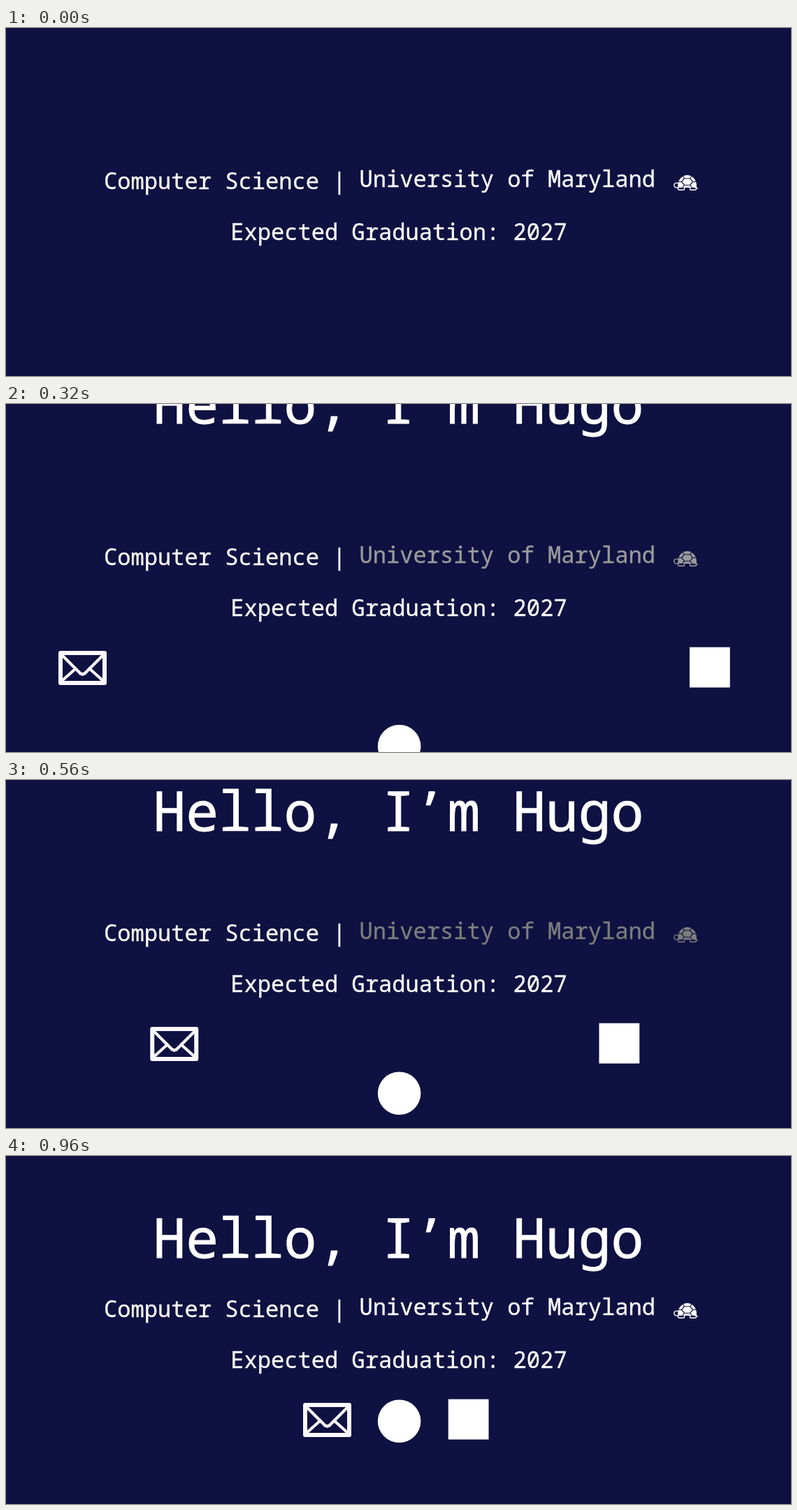
Animation, 1123 px wide and 499 px high, one loop 1000 ms. Source, as an HTML page with a canvas:

```html
<!DOCTYPE html>
<html lang="en">
<head>
<meta charset="utf-8">
<title>Hello</title>
<style>
  html, body { margin: 0; width: 100%; height: 100%; overflow: hidden; background: #0e1141; }
  canvas { display: block; }
</style>
</head>
<body>
<canvas id="stage" width="1123" height="499"></canvas>
<script>
const ctx = document.getElementById('stage').getContext('2d');
const LOOP = 1000, STEP = 40, END = 960;
const BACK = '#0e1141', WHITE = '#fff';
const SMALL = 32.1, LARGE = 78;

// The pulsing words dim towards the middle of the loop and recover.
function greyAt(t) {
  const fade = Math.min(1, Math.abs(t - 475) / 480) ** 0.7;
  const v = Math.round(70 + 185 * fade);
  return `rgb(${v},${v},${v})`;
}

// A hairline outline gives the letters a slightly sturdier weight.
function text(str, x, baseline, size, color = WHITE) {
  ctx.font = `${size}px "Noto Sans Mono", "DejaVu Sans Mono", monospace`;
  ctx.fillStyle = ctx.strokeStyle = color;
  ctx.lineWidth = size / 90;
  ctx.fillText(str, x, baseline);
  ctx.strokeText(str, x, baseline);
}

function line(x1, y1, x2, y2) {
  ctx.beginPath();
  ctx.moveTo(x1, y1);
  ctx.lineTo(x2, y2);
  ctx.stroke();
}

// Runs a drawing twice, the second time flipped left to right.
function mirrored(drawHalf) {
  for (const side of [1, -1]) {
    ctx.save();
    ctx.scale(side, 1);
    drawHalf();
    ctx.restore();
  }
}

function envelope(cx, cy) {
  ctx.save();
  ctx.translate(cx, cy);
  ctx.lineJoin = ctx.lineCap = 'round';
  ctx.strokeStyle = '#fcf8ff';
  ctx.lineWidth = 6;
  ctx.strokeRect(-31.5, -21.5, 63, 43);
  ctx.lineWidth = 4.2;
  mirrored(() => {
    line(-30, -19, -3, 8);
    line(-3, 8, 0, 9);
    line(-30, 19, -10, 1);
  });
  ctx.restore();
}

function turtle(cx, ground, color) {
  ctx.save();
  ctx.translate(cx, ground);
  ctx.fillStyle = ctx.strokeStyle = color;
  ctx.lineWidth = 1.4;

  // Head, legs and tail
  ctx.beginPath();
  ctx.ellipse(-15, -7.5, 3.8, 3.4, 0, 0, 2 * Math.PI);
  ctx.stroke();
  mirrored(() => {
    ctx.beginPath();
    ctx.roundRect(4, -5, 9, 4.3, 1.5);
    ctx.stroke();
  });
  ctx.beginPath();
  ctx.moveTo(11, -8);
  ctx.lineTo(16, -2);
  ctx.lineTo(10, -4);
  ctx.fill();

  // Domed shell with a six-sided plate and radiating seams
  ctx.beginPath();
  ctx.ellipse(0, -6.5, 13.5, 15.5, 0, Math.PI, 2 * Math.PI);
  ctx.ellipse(0, -6.5, 13.5, 2.5, 0, 0, Math.PI);
  ctx.fill();
  ctx.clip();
  ctx.strokeStyle = BACK;
  ctx.lineWidth = 1.2;
  const corner = (i, scale) => {
    const angle = i * Math.PI / 3;
    return [8 * scale * Math.cos(angle), -12.5 + 5.5 * scale * Math.sin(angle)];
  };
  for (let i = 0; i < 6; i++) {
    line(...corner(i, 1), ...corner(i + 1, 1));
    line(...corner(i, 1), ...corner(i, 2));
  }
  ctx.restore();
}

function draw(t) {
  const left = (END - t) / 160;
  const grey = greyAt(t);
  ctx.fillStyle = BACK;
  ctx.fillRect(0, 0, 1123, 499);

  text('Hello, I’m Hugo', 210.4, 146.3 - 29.5 * left, LARGE);
  text('Computer Science |', 140, 231, SMALL);
  text('University of Maryland', 505.5, 228, SMALL, grey);
  turtle(974.5, 233, grey);
  text('Expected Graduation: 2027', 321.3, 304, SMALL);

  envelope(459.5 - 87.5 * left, 378.5);
  ctx.fillStyle = WHITE;
  ctx.beginPath();
  ctx.arc(562.6, 380.3 + 27.6 * left, 30.8, 0, 2 * Math.PI);
  ctx.fill();
  ctx.fillRect(632.7 + 86.3 * left, 348.7, 57.8, 57.8);
}

const start = performance.now();
function tick() {
  const ms = (performance.now() - start) % LOOP;
  const step = Math.floor(ms / STEP);
  // The opening pose holds for two steps.
  draw(step < 2 ? 0 : step * STEP);
  requestAnimationFrame(tick);
}
tick();
</script>
</body>
</html>
```
